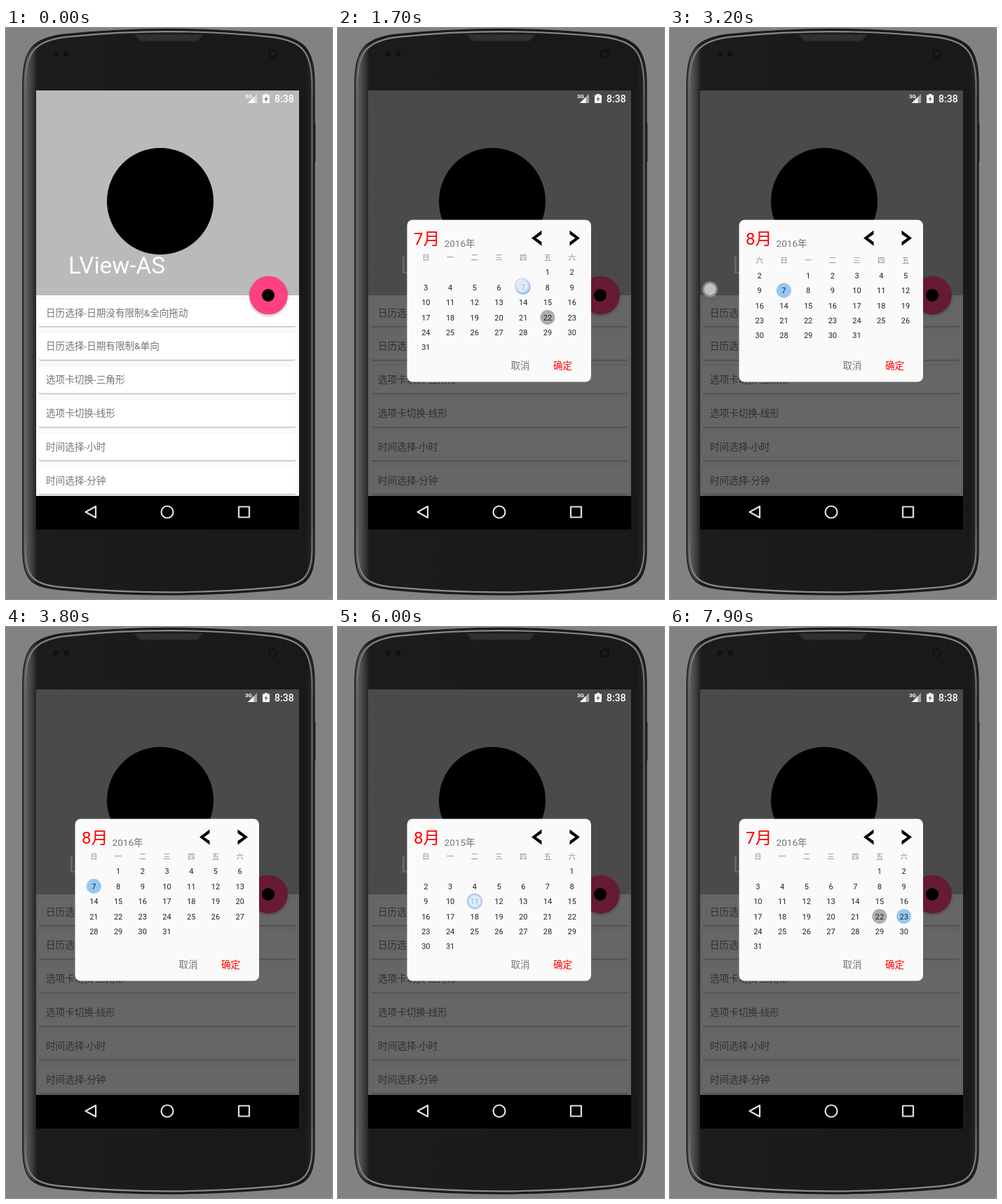
Animation of 465 by 814 pixels, one loop 8 s. Source, as an HTML page:

```html
<!DOCTYPE html>
<html lang="zh-CN">
<head>
<meta charset="utf-8">
<title>Calendar picker</title>
<style>
html, body { margin: 0; width: 100%; height: 100%; overflow: hidden; background: #828282; }
svg { display: block; width: 465px; height: 814px; }
text { font-family: Roboto, "Noto Sans CJK SC", "Noto Sans CJK", "Noto Sans CJK JP", sans-serif; }
#grid text { text-anchor: middle; font-size: 11px; fill: #222; }
#grid text.week { font-size: 10.5px; fill: #8a8a8a; }
.label { font-size: 13.6px; fill: #757575; }
</style>
</head>
<body>
<svg viewBox="0 0 465 814" xmlns="http://www.w3.org/2000/svg">
  <defs>
    <linearGradient id="shell" gradientUnits="userSpaceOnUse" x1="24" y1="0" x2="440" y2="0">
      <stop offset="0" stop-color="#4c4c4c"/>
      <stop offset=".015" stop-color="#585858"/>
      <stop offset=".03" stop-color="#404040"/>
      <stop offset=".05" stop-color="#1c1c1c"/>
      <stop offset=".97" stop-color="#191919"/>
      <stop offset="1" stop-color="#2a2a2a"/>
    </linearGradient>
    <linearGradient id="rim" x1="0" y1="0" x2="0" y2="1">
      <stop offset="0" stop-color="#8a8a8a"/>
      <stop offset=".12" stop-color="#686868"/>
      <stop offset=".88" stop-color="#686868"/>
      <stop offset="1" stop-color="#8c8c8c"/>
    </linearGradient>
    <filter id="soft" x="-30%" y="-30%" width="160%" height="160%"><feGaussianBlur stdDeviation="2"/></filter>
    <filter id="haze"><feGaussianBlur stdDeviation=".7"/></filter>
    <clipPath id="window"><rect x="108" y="316" width="243.5" height="150.5"/></clipPath>
    <path id="body" d="M24 80C24 30 38 14 85 9Q232-6 379 9C426 14 440 30 440 80V745C440 790 425 797 385 801Q232 815 79 801C39 797 24 790 24 745Z"/>
  </defs>

  <rect width="465" height="814" fill="#828282"/>
  <rect x="438" y="135" width="3.5" height="56" rx="1.5" fill="#222"/>
  <use href="#body" fill="url(#shell)" stroke="#1c1c1c" stroke-width="1.500"/>
  <use href="#body" fill="none" stroke="url(#rim)" stroke-width="2.200" filter="url(#haze)" transform="translate(232 405) scale(.983 .991) translate(-232 -405)"/>
  <path d="M183 9H281L275 17Q273 19 269 19H195Q191 19 189 17Z" fill="#2c2c2c"/>
  <path d="M190 12H275M192 15H272" stroke="#404040" stroke-dasharray="2 1"/>
  <g fill="#121214" stroke="#222226">
    <circle cx="71" cy="37" r="5"/><circle cx="86" cy="37" r="5"/><circle cx="380.500" cy="37" r="8"/>
  </g>
  <circle cx="380.500" cy="37" r="3.500" fill="#1a1a20"/>

  <rect x="43" y="89" width="375" height="626"/>
  <rect x="43" y="89" width="375" height="292" fill="#bababa"/>
  <circle cx="220" cy="247" r="76"/>
  <text x="89" y="350" font-size="33.400" fill="#fff">LView-AS</text>
  <rect x="43" y="381" width="375" height="286" fill="#fafafa"/>
  <g id="list"></g>
  <circle cx="374.500" cy="383" r="27" opacity=".3" filter="url(#soft)"/>
  <circle cx="374.500" cy="381" r="27.300" fill="#ff4081"/>
  <circle cx="374" cy="381" r="9"/>
  <rect id="dim" x="43" y="89" width="375" height="578"/>

  <g fill="#fff">
    <text x="341" y="100" font-size="8" font-weight="700">3G</text>
    <path d="M358 94V107H345Z" opacity=".5"/>
    <path d="M353.500 98.500V107H345Z"/>
    <path d="M369 94H373V95.500H376V107H366V95.500H369Z"/>
    <text x="383" y="106" font-size="14" font-weight="500">8:38</text>
  </g>
  <path d="M372 97L368.500 102H370.700L370 105.500L373.700 100.500H371.400Z" fill="#666"/>
  <g fill="none" stroke="#e0e0e0" stroke-width="2.200" stroke-linejoin="round">
    <path d="M113.500 690L128 682V698Z"/>
    <circle cx="230" cy="690" r="8.500"/>
    <rect x="332" y="682.500" width="15" height="15"/>
  </g>

  <g id="dialog">
    <rect x="98.500" y="273.500" width="262.500" height="231" rx="8" fill="#fafafa"/>
    <text id="month" x="108" y="309" font-size="24" fill="#f00"></text>
    <text id="year" class="label" x="151.500" y="312"></text>
    <path d="M290.500 288.500V294L282.500 299.500L290.500 305V310.500L276 299.500Z"/>
    <path d="M330.500 288.500V294L338.500 299.500L330.500 305V310.500L345 299.500Z"/>
    <g clip-path="url(#window)"><g id="grid"></g></g>
    <text class="label" x="246.500" y="485.500">取消</text>
    <text class="label" x="307" y="485.500" style="fill:#f00">确定</text>
  </g>
  <g id="touch">
    <circle r="10.600" fill="#fff" fill-opacity=".3" stroke="#a0a0dc" stroke-opacity=".5" stroke-width="1.300"/>
    <circle r="8.500" fill="#fff" opacity=".5"/>
  </g>
</svg>
<script>
const LOOP = 8000, STEP = 100;
const COL = 34.72, ROW = 21.45, PAGE_W = COL * 7, PAGE_H = ROW * 7;
const LEFT = 108, TOP = 316;
const $ = id => document.getElementById(id);
const clamp = v => Math.max(0, Math.min(1, v));

const items = ["日历选择-日期没有限制&amp;全向拖动", "日历选择-日期有限制&amp;单向",
  "选项卡切换-三角形", "选项卡切换-线形", "时间选择-小时", "时间选择-分钟"];
$("list").innerHTML = items.map((s, i) => {
  const y = 386.5 + i * 47.8;
  const card = (dy, fill) => `<rect x="47" y="${y + dy}" width="366" height="38.5" rx="2.5" fill="${fill}"/>`;
  return card(2, "#d9d9d9") + card(1, "#c4c4c4") + card(-.5, "#ececec") + card(0, "#fff") +
    `<text class="label" x="57" y="${y + 24}">${s}</text>`;
}).join("");

// Scroll offset over time: months run across, years run down.
const path = [
  [1700, 0, 0], [2000, -22, 32], [2300, -53, 55], [2700, -118, 42], [3200, -206, 4.5], [3500, -206, 4.5],
  [3800, -PAGE_W, 0], [4500, -PAGE_W, 0], [4800, -221, 83], [5300, -233, 144],
  [5500, -PAGE_W, PAGE_H], [6000, -PAGE_W, PAGE_H], [6500, -50, PAGE_H],
  [6800, 0, PAGE_H], [7200, 0, PAGE_H], [7600, 0, PAGE_H - 112], [7900, 0, 0]
];

// Each drag: press time, release time, press point, day picked.
const drags = [
  [1700, 3600, 263, 368, 7], [4500, 5400, 202, 352, 2],
  [6000, 6600, 195, 391, 11], [7200, 7700, 264, 412, 23]
];

function scrollAt(t) {
  const i = path.findIndex(k => k[0] > t);
  if (i <= 0) return [0, 0];
  const a = path[i - 1], b = path[i], p = (t - a[0]) / (b[0] - a[0]);
  return [a[1] + (b[1] - a[1]) * p, a[2] + (b[2] - a[2]) * p];
}

function page(m, y, x0, y0, picked) {
  const year = 2016 + y, first = new Date(year, 6 + m, 1).getDay();
  const days = new Date(year, 7 + m, 0).getDate();
  const at = (c, r) => [x0 + COL * (c + .5), y0 + ROW * (r + .5)];
  let out = "";
  [..."日一二三四五六"].forEach((s, c) => {
    const [x, cy] = at(c, 0);
    out += `<text class="week" x="${x}" y="${cy + 3.8}">${s}</text>`;
  });
  for (let d = 1; d <= days; d++) {
    const n = first + d - 1, [x, cy] = at(n % 7, 1 + Math.floor(n / 7));
    const today = !m && !y && d === 22;
    if (d === picked || today)
      out += `<circle cx="${x}" cy="${cy}" r="10.6" fill="${d === picked ? "#96c8f2" : "#adadad"}"/>`;
    out += `<text x="${x}" y="${cy + 4}">${d}</text>`;
  }
  return out;
}

function draw(t) {
  const [sx, sy] = scrollAt(t);
  const fm = Math.round(-sx / PAGE_W), fy = Math.round(-sy / PAGE_H);
  const drag = drags.filter(d => d[0] <= t).pop();
  const picked = drag ? drag[4] : 22;

  $("dim").setAttribute("opacity", t < 500 ? 0 : .6 * clamp((t - 400) / 500));
  $("dialog").setAttribute("opacity", clamp((t - 500) / 200));
  $("month").textContent = 7 + fm + "月";
  $("year").textContent = 2016 + fy + "年";

  let html = "";
  for (let m = fm - 1; m <= fm + 1; m++)
    for (let y = fy - 1; y <= fy + 1; y++) {
      const dx = m * PAGE_W + sx, dy = y * PAGE_H + sy;
      if (Math.abs(dx) < PAGE_W - 1 && Math.abs(dy) < PAGE_H - 1)
        html += page(m, y, LEFT + dx, TOP + dy, m === fm && y === fy ? picked : 0);
    }
  $("grid").innerHTML = html;

  const held = drag && t < drag[1];
  $("touch").setAttribute("visibility", held ? "visible" : "hidden");
  if (held) {
    const [ox, oy] = scrollAt(drag[0]);
    $("touch").setAttribute("transform", `translate(${drag[2] + sx - ox} ${drag[3] + sy - oy})`);
  }
}

const start = performance.now();
let last = -1;
function tick() {
  const t = Math.floor((performance.now() - start) % LOOP / STEP) * STEP;
  if (t !== last) draw(last = t);
  requestAnimationFrame(tick);
}
tick();
</script>
</body>
</html>
```
